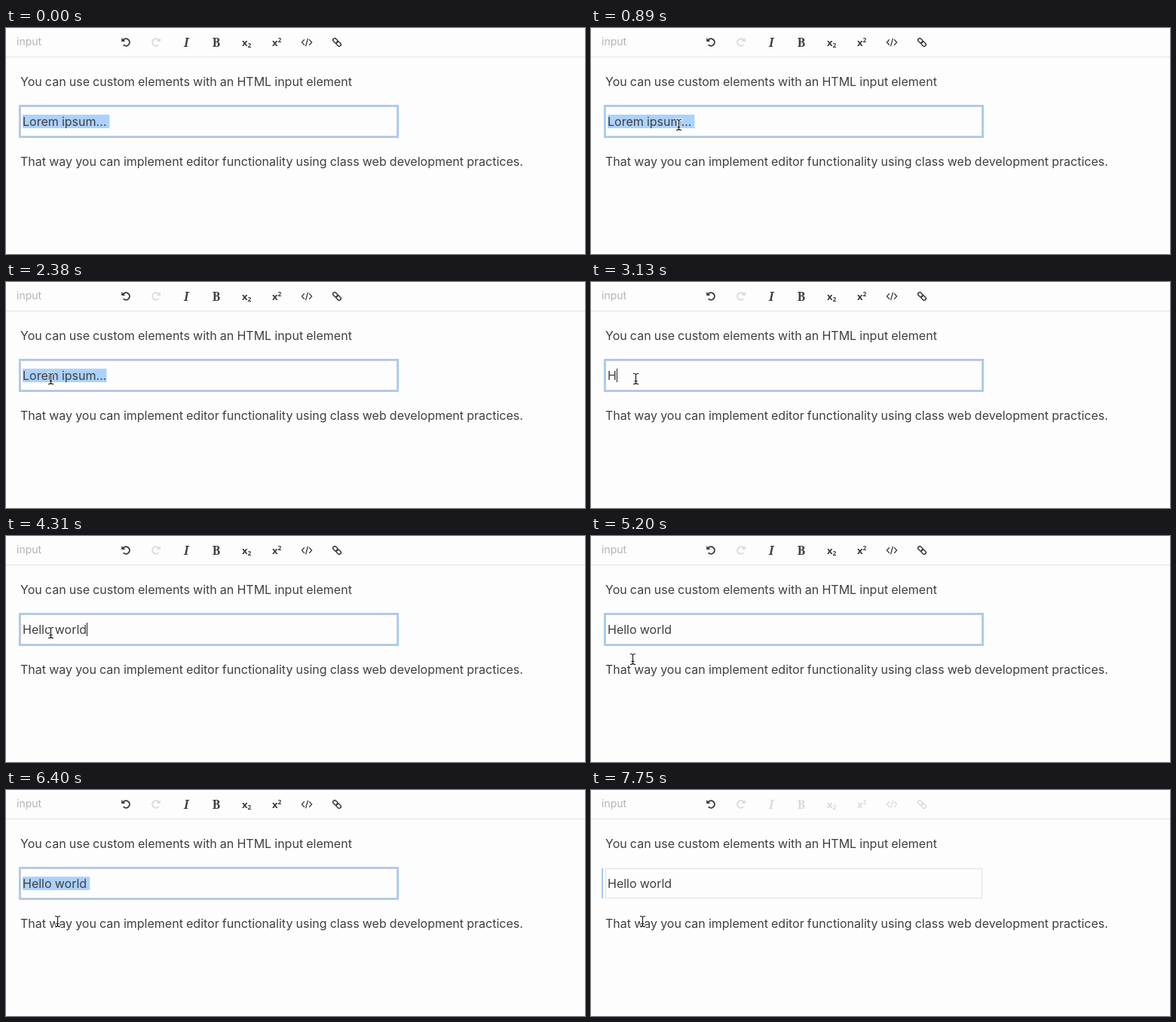
An HTML page with a canvas that plays this animation: 768x300 px, repeating every 8 s.

```html
<!DOCTYPE html>
<html lang="en">
<head>
<meta charset="utf-8">
<title>Custom input element</title>
<style>
  html, body { margin: 0; width: 100%; height: 100%; overflow: hidden; background: #fdfdfd; }
  canvas { display: block; width: 768px; height: 300px; }
</style>
</head>
<body>
<canvas id="stage"></canvas>
<script>
const W = 768, H = 300, LOOP = 8000;
const INK = '#3f3f3f', MUTED = '#b3b3b3', DISABLED = '#dadada';
const RING = '#a6caf4', SELECTION = '#acd2fc', BORDER = '#e0e0e0';
const BODY = '16px Inter, sans-serif', LABEL = '14px Inter, sans-serif';
const FIELD_X = 22, FIELD_BASE = 130;

const canvas = document.getElementById('stage');
const ctx = canvas.getContext('2d');
const dpr = window.devicePixelRatio || 1;
canvas.width = W * dpr;
canvas.height = H * dpr;

const lerp = (a, b, p) => a + (b - a) * p;
const easeOut = p => 1 - (1 - p) ** 2;

// Index of the current hold among `count` evenly spaced ones; -1 before the first.
function holdIndex(t, first, last, count) {
  const i = Math.floor((t - first) / (last - first) * (count - 1) + 1e-6);
  return Math.max(-1, Math.min(count - 1, i));
}

function setFont(font, letterSpacing = '0px', wordSpacing = '0px') {
  Object.assign(ctx, { font, letterSpacing, wordSpacing });
}

const setBodyFont = () => setFont(BODY, '0.01px', '-0.4px');

function text(str, x, y, font, color) {
  setFont(font);
  ctx.fillStyle = color;
  ctx.fillText(str, x, y);
}

function bodyText(str, x, y) {
  setBodyFont();
  ctx.fillStyle = INK;
  ctx.fillText(str, x, y);
}

function bodyWidth(str) {
  setBodyFont();
  return ctx.measureText(str).width;
}

function rect(x, y, w, h, color) {
  ctx.fillStyle = color;
  ctx.fillRect(x, y, w, h);
}

function polyline(points, close) {
  ctx.beginPath();
  points.forEach(([x, y]) => ctx.lineTo(x, y));
  if (close) ctx.closePath();
}

function iconAt(x, color, draw) {
  ctx.save();
  ctx.translate(x, 19);
  ctx.fillStyle = ctx.strokeStyle = color;
  draw(color);
  ctx.restore();
}

function undoIcon() {
  ctx.lineWidth = 2;
  ctx.beginPath();
  ctx.arc(0.2, 0, 4.7, -Math.PI * 0.8, Math.PI * 0.76);
  ctx.stroke();
  polyline([[-5.8, -6], [-5.8, -0.9], [-0.7, -0.9]], true);
  ctx.fill();
}

function redoIcon() {
  ctx.scale(-1, 1);
  undoIcon();
}

function serifIcon(letter, style, color) {
  ctx.textAlign = 'center';
  text(letter, 0, 5.5, style + ' 15.5px "Noto Serif", serif', color);
}

function scriptIcon(baseX, scriptY, color) {
  text('x', -6, baseX, 'bold 13px "Noto Sans", sans-serif', color);
  text('2', 1.6, scriptY, 'bold 8.5px "Noto Sans", sans-serif', color);
}

function codeIcon() {
  ctx.lineWidth = 1.3;
  [[[-3.2, -3.8], [-6.6, 0], [-3.2, 3.8]],
   [[3.2, -3.8], [6.6, 0], [3.2, 3.8]],
   [[1.5, -5.2], [-1.5, 5.2]]].forEach(points => {
    polyline(points);
    ctx.stroke();
  });
}

function linkIcon() {
  ctx.rotate(Math.PI / 4);
  ctx.lineWidth = 1.6;
  for (const x of [-6.4, -0.4]) {
    ctx.beginPath();
    ctx.roundRect(x, -2.3, 6.8, 4.6, 2);
    ctx.stroke();
  }
}

const formatIcons = [
  c => serifIcon('I', 'italic bold', c),
  c => serifIcon('B', 'bold', c),
  c => scriptIcon(4.6, 7, c),
  c => scriptIcon(4.6, 0.4, c),
  codeIcon,
  linkIcon
];

function drawToolbar(mode) {
  if (mode === 'paragraph') {
    text('Paragraph', 14, 23, LABEL, INK);
    ctx.fillStyle = INK;
    polyline([[91, 16], [100.2, 16], [95.6, 21]], true);
    ctx.fill();
  } else {
    text('input', 14, 23, LABEL, MUTED);
  }
  iconAt(159, INK, undoIcon);
  iconAt(199, DISABLED, redoIcon);
  const color = mode === 'editing' ? INK : DISABLED;
  formatIcons.forEach((draw, i) => iconAt(239 + i * 40, color, draw));
  rect(0, 38, W, 1, '#e2e2e2');
}

function drawField({ mode, value, selected, caret }) {
  const focused = mode === 'editing';
  if (focused) rect(17, 102, 504, 44, RING);
  rect(19, 104, 500, 40, focused ? '#c5cddb' : BORDER);
  rect(20, 105, 498, 38, '#fdfdfd');
  if (mode === 'blurred') rect(14, 104, 2, 40, RING);
  if (selected) rect(FIELD_X, 115, selected, 18, SELECTION);
  bodyText(value, FIELD_X, FIELD_BASE);
  if (caret !== undefined) rect(Math.round(FIELD_X + caret), 115, 1, 18, '#222');
}

function drawPointer(x, y) {
  ctx.save();
  ctx.translate(x + 0.5, y - 0.5);
  ctx.lineCap = 'square';
  for (const [color, width] of [['rgba(255,255,255,.85)', 3], ['#111', 1.1]]) {
    ctx.strokeStyle = color;
    ctx.lineWidth = width;
    ctx.beginPath();
    for (const s of [-1, 1]) {
      ctx.moveTo(-3, s * 7);
      ctx.quadraticCurveTo(-0.4, s * 7, 0, s * 5.5);
      ctx.quadraticCurveTo(0.4, s * 7, 3, s * 7);
    }
    ctx.moveTo(0, -5.5);
    ctx.lineTo(0, 5.5);
    ctx.moveTo(-1.5, 3);
    ctx.lineTo(1.5, 3);
    ctx.stroke();
  }
  ctx.restore();
}

function pointerAt(t) {
  if (t < 150) return null;
  if (t < 1330) {
    const p = easeOut(Math.min(1, holdIndex(t, 150, 1180, 8) / 6));
    return [lerp(653, 101, p), lerp(175, 128, p)];
  }
  if (t < 4760) {
    const i = holdIndex(t, 1330, 2230, 7);
    return [[100, 97, 93, 88, 72, 59, 59][i], i < 4 ? 127 : 129];
  }
  if (t < 5650) {
    const p = Math.min(1, (holdIndex(t, 4760, 5350, 5) + 1) / 4);
    return [lerp(59, 54, p), lerp(129, 175, p)];
  }
  return [[58, 64, 68][holdIndex(t, 5650, 5950, 3)], 175];
}

function fieldAt(t) {
  const lorem = 'Lorem ipsum...', hello = 'Hello world';
  const field = { mode: 'editing', value: t < 3130 ? lorem : hello };
  if (t < 1180) {
    field.selected = bodyWidth(lorem) + 4;
  } else if (t < 2230) {
    if (t < 1630 || t >= 2080) field.caret = bodyWidth(t < 1630 ? 'Lorem ips' : 'Lore');
  } else if (t < 3130) {
    field.selected = bodyWidth(t < 2380 ? 'Lorem' : lorem);
  } else if (t < 5350) {
    const typed = t < 4310 ? [1, 2, 4, 5, 6, 7, 9, 10][holdIndex(t, 3130, 4160, 8)] : 11;
    field.value = hello.slice(0, typed);
    if (t < 4760) field.caret = bodyWidth(field.value);
  } else if (t < 6400) {
    field.mode = 'paragraph';
  } else if (t < 7750) {
    field.selected = bodyWidth(hello) + 4;
  } else {
    field.mode = 'blurred';
  }
  return field;
}

function render(t) {
  ctx.setTransform(dpr, 0, 0, dpr, 0, 0);
  rect(0, 0, W, H, '#fdfdfd');
  const field = fieldAt(t);
  drawToolbar(field.mode);
  bodyText('You can use custom elements with an HTML input element', 19, 77);
  drawField(field);
  bodyText('That way you can implement editor functionality using class web development practices.', 19, 183);
  if (t >= 5350 && t < 5650) rect(Math.round(19 + bodyWidth('That')), 168, 1, 18, '#222');
  const pointer = pointerAt(t);
  if (pointer) drawPointer(Math.round(pointer[0]), Math.round(pointer[1]));
}

const start = performance.now();
function tick() {
  render((performance.now() - start) % LOOP);
  requestAnimationFrame(tick);
}
tick();
</script>
</body>
</html>
```
